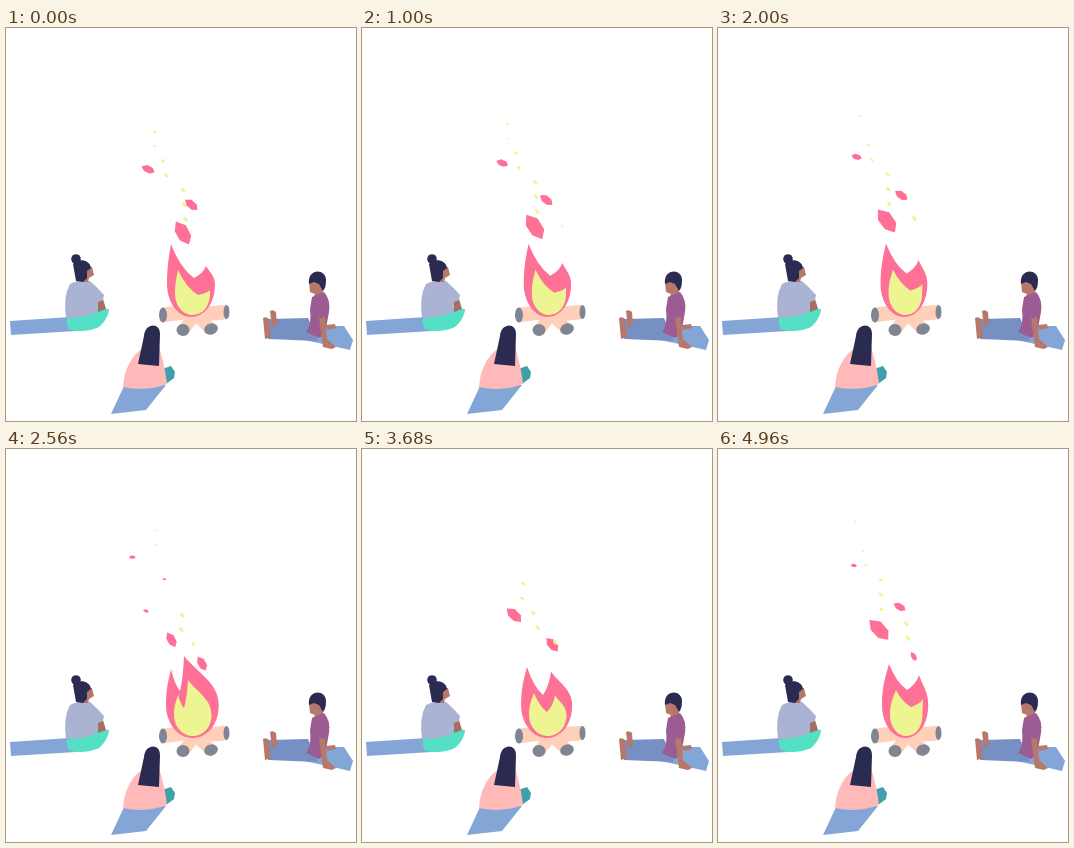
Write an HTML page that moves like this. It is 350x393 px and loops after 5000 ms.

```html
<!DOCTYPE html>
<html lang="en">
<head>
<meta charset="utf-8">
<title>Campfire</title>
<style>
  html, body { margin: 0; width: 100%; height: 100%; overflow: hidden; background: #fff; }
  svg { display: block; width: 100vw; height: 100vh; }
</style>
</head>
<body>
<svg viewBox="0 0 350 393">
  <!-- left sitter -->
  <path fill="#84a6d6" d="M4 293L64 289L70 303L5 307Z"/>
  <path fill="#53e0c4" d="M61 288L92 280L103 281C103 287 98 295 93 299C84 304 68 304 63 301Q60 297 61 288Z"/>
  <path fill="#a56f65" d="M91 272L97 271L100 281L92 284Z"/>
  <path fill="#abb3d3" d="M64 256Q73 251 84 253Q91 259 98 267L97 272L92 274L91 284Q79 290 60 290Q57 268 64 256Z"/>
  <path fill="#b5786a" d="M79 239L86 239L88 247L83 250L82 254L76 254Z"/>
  <path fill="#2b2b52" d="M67 236C71 230 84 231 85 240L81 243L81 250L77 254L70 253Z"/>
  <circle cx="70" cy="231" r="4.8" fill="#2b2b52"/>

  <!-- right sitter -->
  <path fill="#84a6d6" d="M298 291L307 298L338 298L347 312L344 322L322 317L298 312Z"/>
  <path fill="#7690c3" d="M262 291L302 290L312 313L262 311Z"/>
  <g fill="#b5786a">
    <path d="M257 290Q260 288 263 291L265 309L259 311Z"/>
    <path d="M264 283Q267 281 270 284L271 297L266 299Z"/>
    <path d="M320 297L329 296L330 300L321 302Z"/>
    <path d="M303 254L314 254L317 262L317 270L307 270L309 266L304 264Z"/>
  </g>
  <path fill="#9b5c93" d="M306 269L318 264Q325 272 323 284L319 306L313 310L300 304Q306 297 304 281Z"/>
  <path fill="#b5786a" d="M313 290L319 289L321 311L330 319L326 321L317 319Z"/>
  <path fill="#2b2b52" d="M303 256C301 240 320 240 320 252Q320 260 317 263L313 256L308 254Z"/>

  <!-- logs -->
  <g stroke="#ffcfba" stroke-width="14.5">
    <path d="M157 287L195 282M220 284L186 287"/>
    <path stroke-width="12" d="M192 284L177 302M186 284L204 300"/>
  </g>
  <g fill="#7f8592">
    <ellipse cx="157" cy="287" rx="4" ry="7.5"/>
    <ellipse cx="220.5" cy="284" rx="3" ry="7"/>
    <ellipse cx="177" cy="302" rx="6.5" ry="6"/>
    <ellipse cx="205" cy="301" rx="7" ry="5.5" transform="rotate(-20 205 301)"/>
  </g>

  <path id="outer" fill="#ff7096"/>
  <path id="inner" fill="#edf592"/>
  <g id="sparks"></g>

  <!-- front sitter -->
  <path fill="#84a6d6" d="M119 356L160 357L140 382L105 386Z"/>
  <path fill="#3fa0aa" d="M156 341L165 338L169 344L168 350L160 356Z"/>
  <path fill="#ffb9b8" d="M117 359C118 342 125 328 137 320L153 319Q159 338 161 356Q140 364 117 359Z"/>
  <path fill="#2b2b52" d="M138 308C139 295 154 294 154 306L153 338L132 336Z"/>
</svg>
<script>
const LOOP = 5000, CYCLE = 960, STEP = 40;
const PINK = '#ff7096', YELLOW = '#edf592';
const get = id => document.getElementById(id);
const mix = (a, b, k) => a + (b - a) * k;
const random = n => Math.abs(Math.sin(n * 12.9898) * 43758.5453) % 1;

// Flame crest poses: left tip, valley, right tip
const poses = [
  { at: 0, crest: [165, 216, 188, 250, 200, 238] },
  { at: 160, crest: [171, 215, 189, 241, 201, 226] },
  { at: 320, crest: [179, 218, 187, 235, 193, 207] },
  { at: 520, crest: [167, 204, 182, 237, 185, 215] },
  { at: 640, crest: [165, 220, 174, 242, 178, 207] }
];
poses.push({ at: CYCLE, crest: poses[0].crest });

function crestAt(t) {
  const i = poses.findIndex(p => p.at > t), a = poses[i - 1], b = poses[i];
  return a.crest.map((v, n) => mix(v, b.crest[n], (t - a.at) / (b.at - a.at)));
}

function flame([ax, ay, vx, vy, bx, by], lx, rx, sideY, base) {
  const mx = (lx + rx) / 2;
  return `M${ax} ${ay}` +
    `Q${mix(ax, vx, .4)} ${mix(ay, vy, .7)} ${vx} ${vy}` +
    `Q${mix(vx, bx, .8)} ${mix(vy, by, .4)} ${bx} ${by}` +
    `C${mix(bx, rx, .4)} ${mix(by, sideY, .35)} ${rx} ${mix(by, sideY, .55)} ${rx} ${sideY}` +
    `C${rx} ${mix(sideY, base, .6)} ${mix(mx, rx, .55)} ${base} ${mx} ${base}` +
    `C${mix(mx, lx, .55)} ${base} ${lx} ${mix(sideY, base, .55)} ${lx} ${sideY}` +
    `C${lx} ${mix(sideY, ay, .45)} ${mix(lx, ax, .5)} ${mix(sideY, ay, .7)} ${ax} ${ay}Z`;
}

function drawFlame(t) {
  const angle = t / CYCLE * 2 * Math.PI;
  const lean = Math.cos(angle - 1.9), swell = -Math.cos(angle);
  const crest = crestAt(t);
  const inset = [7, 26, 4, 17, 4, 24];
  get('outer').setAttribute('d', flame(crest, 162 + 3 * lean, 211.5 + 2.5 * swell, 256, 289));
  get('inner').setAttribute('d',
    flame(crest.map((v, n) => v + inset[n]), 170 + 3 * lean, 205 + swell, 266, 287));
}

const sparks = [];
function spark(color, birth, life, x, y, dx, dy, size) {
  const node = document.createElementNS('http://www.w3.org/2000/svg', 'path');
  node.setAttribute('fill', color);
  node.setAttribute('d', 'M-.25 -.5L.15 -.3L.33 .15L.2 .5L-.15 .3L-.33 -.1Z');
  get('sparks').append(node);
  sparks.push({ node, birth, life, x, y, dx, dy, size });
}

spark(PINK, 560, 1100, 199, 224, -22, -130, 17);
spark(PINK, 900, 800, 183, 214, -62, -121, 27);
spark(PINK, 1080, 620, 200, 214, -46, -100, 12);
spark(PINK, 420, 360, 175, 173, -48, -18, 9);
spark(PINK, 600, 620, 169, 197, -36, -96, 20);
spark(YELLOW, 240, 460, 188, 247, -22, -28, 16);

// Small embers drift up and left in a loose plume
for (let i = 0; i < 9; i++) {
  const life = 600 + 350 * random(i + 1);
  spark(YELLOW, 440 + i * 75, life, 170 + 34 * random(i + 20), 205, -.08 * life, -.195 * life, 6);
}

function drawSpark(s, t) {
  const age = (t - s.birth + 2 * CYCLE) % CYCLE;
  // A spark may outlive one cycle by a little; its faded tail is dropped
  const k = Math.min(1, age / s.life);
  const x = s.x + s.dx * k - 6 * Math.sin(Math.PI * k);
  const y = s.y + s.dy * k;
  const scale = s.size * Math.min(1, k * 12) * (1 - k * k);
  s.node.setAttribute('transform', `translate(${x} ${y}) rotate(${-70 * k}) scale(${scale})`);
}

function draw(time) {
  const t = Math.floor((time % LOOP) / STEP) * STEP % CYCLE;
  drawFlame(t);
  sparks.forEach(s => drawSpark(s, t));
}

const start = performance.now();
function tick() {
  draw(performance.now() - start);
  requestAnimationFrame(tick);
}
tick();
</script>
</body>
</html>
```
